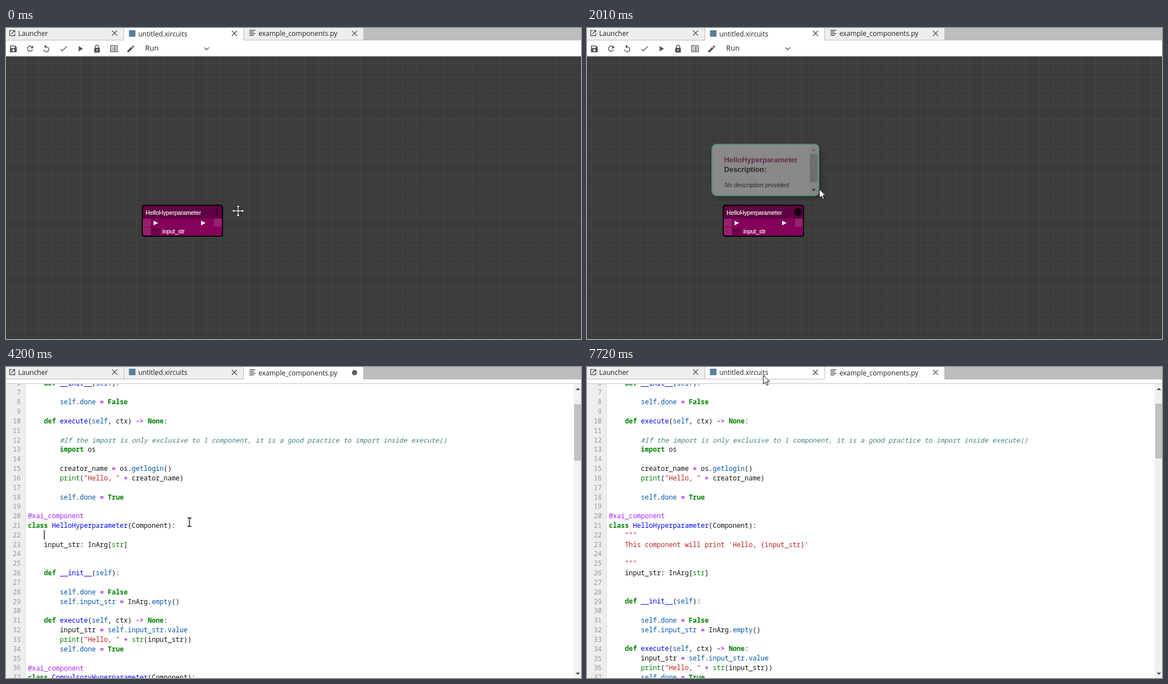
An HTML page that plays this animation: 1017 by 551 pixels, repeating every 8000 ms.

```html
<!DOCTYPE html>
<html lang="en">
<head>
<meta charset="utf-8">
<title>Component description</title>
<style>
html, body { margin: 0; width: 100%; height: 100%; overflow: hidden; background: #fff; }
svg { display: block; }
text { white-space: pre; }
.ui { font: 12px "Open Sans", sans-serif; fill: #212121; }
.arial { font: 10.3px "Liberation Sans", Arial, sans-serif; }
.mono { font: 11.77px "Noto Sans Mono", "DejaVu Sans Mono", monospace; fill: #111; }
.line { fill: none; stroke: #555; stroke-width: 1.4; }
.icon { fill: #555; }
.num { fill: #999; text-anchor: end; }
.cmt { fill: #408080; font-style: italic; }
.str { fill: #ba2121; }
.meta { fill: #a2f; }
.key { fill: #008000; font-weight: bold; }
.def { fill: #00f; }
.fn { fill: #008000; }
.prop { fill: #05a; }
.op { fill: #a2f; font-weight: bold; }

/* One loop is 8 s, so 1% is 80 ms. */
.hard { animation: 8s step-end infinite; }
.soft { animation: 8s linear infinite; }

#canvas { animation-name: canvas; }
#editor { animation-name: editor; }
@keyframes canvas { 0% { visibility: visible } 34.375%, 100% { visibility: hidden } }
@keyframes editor { 0% { visibility: hidden } 34.375%, 100% { visibility: visible } }

#bg2 { animation-name: bg2; }
#bg3 { animation-name: bg3; }
#label2 { animation-name: label2; }
#label3 { animation-name: label3; }
@keyframes bg2 {
  0% { fill: #fff; height: 22px }
  34.375% { fill: #eee; height: 21px }
  92%, 100% { fill: #fff; height: 21px }
}
@keyframes bg3 {
  0% { fill: #eee; height: 21px }
  31% { fill: #fff; height: 21px }
  34.375%, 100% { fill: #fff; height: 22px }
}
@keyframes label2 { 0% { transform: translateY(1px) } 34.375%, 100% { transform: none } }
@keyframes label3 { 0% { transform: none } 34.375%, 100% { transform: translateY(1px) } }

#saved { animation-name: saved; }
#dirty { animation-name: dirty; }
@keyframes saved { 0% { opacity: 1 } 52.375% { opacity: 0 } 86.9%, 100% { opacity: 1 } }
@keyframes dirty { 0% { opacity: 0 } 52.375% { opacity: 1 } 86.9%, 100% { opacity: 0 } }

#hover { animation-name: hover; }
#focus { animation-name: focus; }
@keyframes hover { 0% { opacity: 0 } 2.5% { opacity: .3 } 23.4%, 100% { opacity: 0 } }
@keyframes focus { 0% { opacity: 0 } 6.9% { opacity: .8 } 27.9%, 100% { opacity: 0 } }

#tip { animation-name: tip; }
@keyframes tip {
  0% { opacity: 0 }
  6.625% { opacity: 0; animation-timing-function: ease }
  10.25% { opacity: 1 }
  24.1875% { opacity: 1; animation-timing-function: ease }
  27.9375%, 100% { opacity: 0 }
}

#rest { animation-name: rest; }
#doc { animation-name: doc; }
#thumb { animation-name: thumb; }
#caret { animation-name: caret; }
@keyframes rest {
  0% { transform: none }
  52.375% { transform: translateY(17px) }
  60.625%, 100% { transform: translateY(67px) }
}
@keyframes doc { 0% { opacity: 0 } 60.625%, 100% { opacity: 1 } }
@keyframes thumb {
  0% { y: 66px; height: 100px }
  60.625%, 100% { y: 65px; height: 97px }
}
@keyframes caret {
  0% { opacity: 1; transform: translate(300px, 272px) }
  41.5% { opacity: 0; transform: translate(300px, 272px) }
  47.5% { opacity: 1; transform: translate(300px, 272px) }
  52.375% { opacity: 1; transform: translate(67px, 289px) }
  59% { opacity: 0; transform: translate(67px, 289px) }
  60.625% { opacity: 1; transform: translate(88px, 339px) }
  66.375% { opacity: 0; transform: translate(88px, 339px) }
  73.4% { opacity: 1; transform: translate(88px, 339px) }
  80.125% { opacity: 0; transform: translate(88px, 339px) }
  86.9% { opacity: 1; transform: translate(88px, 339px) }
  93.9%, 100% { opacity: 0; transform: translate(88px, 339px) }
}

#click { animation-name: click; }
@keyframes click { 0% { opacity: 0 } 33.5% { opacity: .8 } 34.375%, 100% { opacity: 0 } }

#pointer { animation-name: pointer; }
@keyframes pointer {
  0%, .5% { transform: translate(410.5px, 324px) }
  2.5%, 4.25% { transform: translate(373px, 323px) }
  4.375%, 23% { transform: translate(373px, 324px) }
  25%, 25.3% { transform: translate(411px, 285.5px) }
  28% { transform: translate(456px, 140px) }
  30.5% { transform: translate(493px, 32px) }
  32%, 34.6% { transform: translate(506px, 8.5px) }
  38% { transform: translate(440px, 125px) }
  41.5% { transform: translate(345px, 255px) }
  43.375%, 66.375% { transform: translate(324.5px, 275px) }
  75.25%, 83.4% { transform: translate(296px, 318px) }
  87.5% { transform: translate(318px, 150px) }
  91.2% { transform: translate(322px, 38px) }
  93.125% { transform: translate(313px, 13px) }
  94%, 95.6% { transform: translate(310.5px, 14px) }
  96.4%, 100% { transform: translate(312px, 14.5px) }
}
#move { animation-name: move; }
#hand { animation-name: hand; }
#arrow { animation-name: arrow; }
#beam { animation-name: beam; }
@keyframes move { 0% { opacity: 1 } 2.5% { opacity: 0 } 25.8% { opacity: 1 } 30% { opacity: 0 } 100% { opacity: 0 } }
@keyframes hand { 0% { opacity: 0 } 2.5% { opacity: 1 } 23.4%, 100% { opacity: 0 } }
@keyframes arrow {
  0% { opacity: 0 } 23.4% { opacity: 1 } 25.8% { opacity: 0 }
  30% { opacity: 1 } 35.3% { opacity: 0 } 91.4%, 100% { opacity: 1 }
}
@keyframes beam { 0% { opacity: 0 } 35.3% { opacity: 1 } 91.4%, 100% { opacity: 0 } }
</style>
</head>
<body>
<svg width="1017" height="551" viewBox="0 0 1017 551">
  <defs>
    <path id="cross" class="line" d="M-4.5-4.5 4.5 4.5M4.5-4.5-4.5 4.5"/>
  </defs>

  <g id="canvas" class="hard">
    <rect y="50" width="1017" height="501" fill="#3c3c3c"/>
    <path id="grid" fill="none" stroke="#464646"/>
    <rect y="21" width="1017" height="29" fill="#fff"/>
    <path d="M0 50H1017" stroke="#bdbdbd"/>

    <g id="toolbar">
      <path class="icon" fill-rule="evenodd" d="M7 32q0-1 1-1h8l3 3v8q0 1-1 1H8q-1 0-1-1zM8.5 32.500v3h7v-3zM13 37.500a2 2 0 1 0 .1 0z"/>
      <path class="line" d="M46 33.500A4.600 4.600 0 1 0 47 38"/>
      <path class="icon" d="M48 31v5h-5z"/>
      <path class="line" d="M68.500 34A4.600 4.600 0 1 1 66.500 38"/>
      <path class="icon" d="M71 30v6l-4-3z"/>
      <path class="line" d="M96.500 37.500 99.500 40.500 107.500 32.500"/>
      <path class="icon" d="M128.500 32v9.500l7.500-4.750z"/>
      <rect class="icon" x="156" y="35" width="10" height="8.500" rx="1"/>
      <path class="line" d="M158 35.500v-2a3 3 0 0 1 6 0v2"/>
      <circle cx="161" cy="39" r="1.200" fill="#fff"/>
      <rect class="line" x="185.200" y="31.500" width="11.500" height="10.500"/>
      <path class="line" stroke-dasharray="1.500 1 4.500" d="M187.500 34.500H195M187.500 37H195M187.500 39.500H195"/>
      <path class="icon" d="M214.500 43v-2.500l7-7 2.500 2.500-7 7zM222.300 32.700l1.500-1.500q.5-.5 1 0l1.500 1.500q.5.5 0 1l-1.500 1.500z"/>
      <text class="ui" x="246" y="39.500" style="font-size:13px">Run</text>
      <path class="line" d="M350.500 34.500 354.700 38.500 359 34.500"/>
    </g>

    <g id="node">
      <rect x="241" y="314" width="142" height="55" rx="4" fill="#84005b"/>
      <rect x="242" y="315" width="140" height="22.500" fill="#5e0041"/>
      <path fill="#96206f" d="M242 338h14v14h-14zM242 353h14v14h-14zM368 338h13.500v14H368z"/>
      <rect x="257" y="354" width="14" height="13" fill="#6c004a"/>
      <path d="M259 358.500H270" stroke="#33002a" stroke-width="1.500" stroke-dasharray="2 1.500"/>
      <path fill="#fff" d="M261 341.500v8l8-4zM345 341.500v8l8-4z"/>
      <text class="arial" x="247" y="330.500" fill="#fff" stroke="#fff" stroke-width=".2">HelloHyperparameter</text>
      <text class="arial" x="276.500" y="364" fill="#fff" stroke="#fff" stroke-width=".2">input_str</text>
      <rect x="241" y="314" width="142" height="55" rx="4" fill="none" stroke="#000" stroke-width="2"/>
      <path d="M373 320.500v2M373 325v2M373 329.500v2" stroke="#14000e" stroke-width="2"/>
      <rect id="hover" class="hard" x="361" y="316" width="21" height="18"/>
      <circle id="focus" class="hard" cx="373" cy="326" r="7"/>
    </g>

    <g id="tip" class="soft">
      <rect x="221" y="206" width="189" height="91" rx="8" fill="#c2c2c2" stroke="#5cbdb7" stroke-width="2" style="filter:drop-shadow(3px 3px 3px #0007)"/>
      <rect x="392.500" y="207" width="16.500" height="89" fill="#bababa"/>
      <rect x="394" y="223" width="13.500" height="50" fill="#929292"/>
      <path d="M397 218l4-4 4 4z" fill="#858585"/>
      <path d="M397 285l4 4 4-4z" fill="#333"/>
      <g class="arial" style="font-size:12.850px;font-weight:bold">
        <text x="242.500" y="238" fill="#7d1c56">HelloHyperparameter</text>
        <text x="242.500" y="255" fill="#1c1c1c">Description:</text>
      </g>
      <text class="arial" x="243" y="282" fill="#1c1c1c" style="font-size:10.850px;font-style:italic">No description provided</text>
    </g>
  </g>

  <g id="editor" class="hard">
    <rect y="22" width="1017" height="529" fill="#fff"/>
    <rect y="30" width="34" height="521" fill="#eee"/>
    <path d="M34.500 30V551" stroke="#ddd"/>
    <g class="mono">
      <g id="numbers" class="num"></g>
      <g id="top"></g>
      <g id="doc" class="hard str"></g>
      <g id="rest" class="hard"></g>
    </g>
    <rect id="caret" class="hard" width="1.200" height="17" fill="#000"/>
    <rect x="1004" y="30" width="13" height="521" fill="#f1f1f1"/>
    <rect id="thumb" class="hard" x="1005" y="66" width="12" height="100" fill="#c1c1c1"/>
    <path d="M1007.500 41l4-4 4 4z" fill="#505050"/>
    <path d="M1007.500 541.500l4 4 4-4z" fill="#505050"/>
    <rect y="21" width="1017" height="8" fill="#fff"/>
    <path d="M0 29.500H1017" stroke="#c4c4c4"/>
  </g>

  <g id="tabs">
    <rect width="1017" height="22" fill="#bdbdbd"/>
    <rect width="208" height="21" fill="#eee"/>
    <rect id="bg2" class="hard" x="209" width="211" height="22"/>
    <rect id="bg3" class="hard" x="421" width="211" height="21"/>
    <path class="line" d="M10.500 4.500H6.500v9h9v-4M12 4.500h3.500v3.500M15.500 4.500 9.500 10.500"/>
    <text class="ui" x="21.500" y="13.500">Launcher</text>
    <use href="#cross" x="192" y="9"/>
    <g id="label2" class="hard">
      <rect x="217.500" y="3" width="11.500" height="11.500" fill="#557f9b"/>
      <text class="ui" x="234" y="13.500">untitled.xircuits</text>
    </g>
    <use href="#cross" x="404" y="9.500"/>
    <g id="label3" class="hard">
      <path class="line" d="M430.500 4H441M430.500 7H438M430.500 10H441M430.500 13H438"/>
      <text class="ui" x="446.500" y="13.500">example_components.py</text>
    </g>
    <use id="saved" class="hard" href="#cross" x="616.500" y="9.500"/>
    <circle id="dirty" class="hard" cx="616.500" cy="10" r="4.700" fill="#616161"/>
  </g>

  <circle id="click" class="hard" cx="505.500" cy="10" r="11.500" fill="#f6f63a"/>
  <g id="pointer" class="soft" stroke="#000" fill="#fff" stroke-linejoin="round">
    <path id="move" class="hard" d="M0-10.500 4-6.500H1.200V-1.200H6.500V-4L10.500 0 6.500 4V1.200H1.200V6.500H4L0 10.500-4 6.500H-1.200V1.200H-6.500V4L-10.500 0-6.500-4V-1.200H-1.200V-6.500H-4Z"/>
    <path id="hand" class="hard" d="M-2 2C-2 0 2 0 2 2V8c1.500-1 3.200-.5 3.600.8 1.200-.7 2.400 0 2.700 1 1.400-.4 2.200.4 2.200 1.800V15c0 2-1.600 3-1.600 6.500H-1c-.5-2.500-4.800-6.500-5.200-9-.3-1.600 1.600-2 2.600-.9L-2 13z"/>
    <path id="arrow" class="hard" d="M0 0V15.500l3.600-3.300 2.400 5.600 2.500-1-2.400-5.500h4.900z"/>
    <path id="beam" class="hard" fill="none" stroke-width="1.300" d="M-3.500-7.500H-1.200Q0-7.500 0-6.300 0-7.500 1.200-7.500H3.500M0-6.500V6.500M-3.500 7.500H-1.200Q0 7.500 0 6.300 0 7.500 1.200 7.500H3.500"/>
  </g>
</svg>

<script>
const $ = id => document.getElementById(id);

const CELL = 24.74;
let grid = "";
for (let i = 0; i < 42; i++) {
  grid += `M${Math.round(8 + i * CELL) + .5} 51V551`;
  grid += `M0 ${Math.round(62 + i * CELL) + .5}H1017`;
}
$("grid").setAttribute("d", grid);

const TOKEN = new RegExp([
  "(?<cmt>#.*)",
  "(?<str>\"[^\"]*\")",
  "(?<meta>@\\w+)",
  "(?<key>\\b(?:def|class|import|False|True|None)\\b)",
  "(?<def>(?<=def |class )\\w+)",
  "(?<fn>\\b(?:print|str)\\b)",
  "(?<prop>\\bself\\b|(?<=\\.)\\w+)",
  "(?<op>->|[=+])"
].join("|"), "g");

function paint(line) {
  return line.replace(TOKEN, (text, ...args) => {
    const groups = args[args.length - 1];
    const kind = Object.keys(groups).find(k => groups[k] !== undefined);
    return `<tspan class="${kind}">${text.replace(">", "&gt;")}</tspan>`;
  });
}

const baseline = n => Math.round(285 + (n - 21) * 16.83);
const row = (x, n, content) => `<text x="${x}" y="${baseline(n)}">${content}</text>`;

function fill(id, first, lines, format = paint) {
  $(id).innerHTML = lines.map((line, i) => row(38.8, first + i, format(line))).join("");
}

fill("top", 6, `    def __init__(self):

        self.done = False

    def execute(self, ctx) -> None:

        #If the import is only exclusive to 1 component, it is a good practice to import inside execute()
        import os

        creator_name = os.getlogin()
        print("Hello, " + creator_name)

        self.done = True

@xai_component
class HelloHyperparameter(Component):`.split("\n"));

fill("doc", 22, `    """
    This component will print 'Hello, {input_str}'

    """`.split("\n"), line => line);

fill("rest", 22, `    input_str: InArg[str]


    def __init__(self):

        self.done = False
        self.input_str = InArg.empty()

    def execute(self, ctx) -> None:
        input_str = self.input_str.value
        print("Hello, " + str(input_str))
        self.done = True

@xai_component
class CompulsoryHyperparameter(Component):`.split("\n"));

$("numbers").innerHTML = Array.from({ length: 32 }, (_, i) => row(26, i + 6, i + 6)).join("");
</script>
</body>
</html>
```
